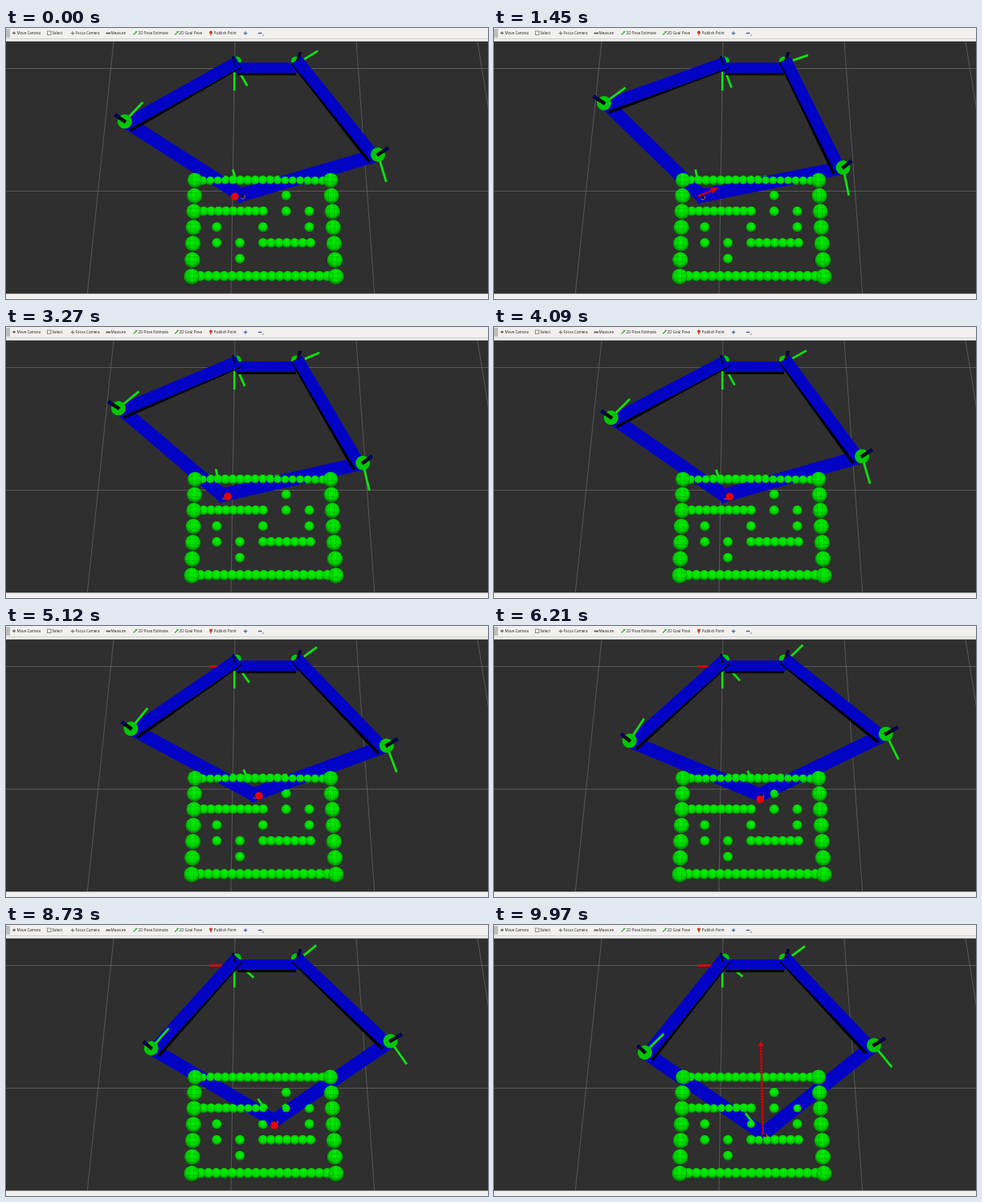
Animation of 600x338 px, one loop 10 s. Source, as an HTML page with a canvas:

```html
<!DOCTYPE html>
<html>
<head>
<meta charset="utf-8">
<style>
html, body { margin: 0; width: 100%; height: 100%; overflow: hidden; background: #303030; }
canvas { display: block; width: 600px; height: 338px; }
</style>
</head>
<body>
<canvas id="stage" width="600" height="338"></canvas>
<script>
const ctx = document.getElementById('stage').getContext('2d');
const LOOP = 10000, LEAD = 320, QUARTER = Math.PI / 2;
const BLUE = '#0303c6', SHADE = '#020208', LIME = '#12e012', RED = '#e60404';
const BASE_L = [284.5, 44.5], BASE_R = [364.5, 43];

// Effector waypoints: time, x, y
const PATH = [[0, 292.5, 210], [1700, 252, 211], [2450, 252, 211], [6210, 331, 212], [9970, 335, 262]];

function pathAt(t) {
  const next = PATH.findIndex(p => p[0] > t);
  const i = next < 0 ? PATH.length - 1 : next;
  const [t0, x0, y0] = PATH[i - 1], [t1, x1, y1] = PATH[i];
  const k = Math.min(1, (t - t0) / (t1 - t0));
  return [x0 + (x1 - x0) * k, y0 + (y1 - y0) * k];
}

// Perspective of the work plane; one unit is one grid cell
const HORIZON = -1695, NEAR = 1 / 1745, DEPTH = 4.62e-5;
const cellWidth = y => (y - HORIZON) * 0.0882;
const middle = y => 285.3 - 0.0159 * y;

function toPlane([x, y]) {
  return [(x - middle(y)) / cellWidth(y), (NEAR - 1 / (y - HORIZON)) / DEPTH];
}

function toScreen([u, v]) {
  const y = 1 / (NEAR - v * DEPTH) + HORIZON;
  return [middle(y) + u * cellWidth(y), y];
}

function elbow(pivot, tip, upper, lower, side) {
  const [bx, by] = toPlane(pivot), [tx, ty] = toPlane(tip);
  const dx = tx - bx, dy = ty - by, d = Math.hypot(dx, dy);
  const along = (upper ** 2 - lower ** 2 + d * d) / (2 * d);
  const out = side * Math.sqrt(upper ** 2 - along ** 2);
  return toScreen([bx + (dx * along - dy * out) / d, by + (dy * along + dx * out) / d]);
}

function poseAt(t) {
  const tip = pathAt(t);
  return {
    tip,
    goal: pathAt(t + LEAD),
    left: elbow([281, 38], tip, 0.987, 1.084, 1),
    right: elbow([367, 40], tip, 0.974, 1.088, -1)
  };
}

const angle = (a, b) => Math.atan2(b[1] - a[1], b[0] - a[0]);
const polar = (p, r, a) => [p[0] + r * Math.cos(a), p[1] + r * Math.sin(a)];

function line(a, b, color, width) {
  ctx.strokeStyle = color;
  ctx.lineWidth = width;
  ctx.beginPath();
  ctx.moveTo(...a);
  ctx.lineTo(...b);
  ctx.stroke();
}

function dot(x, y, r, color) {
  ctx.fillStyle = color;
  ctx.beginPath();
  ctx.arc(x, y, r, 0, 7);
  ctx.fill();
}

function link(a, b, width, start, end, shadeSide = 0) {
  const dir = angle(a, b), p = polar(a, -start, dir), q = polar(b, end, dir);
  if (shadeSide) {
    const side = dir + shadeSide * QUARTER;
    line(polar(p, 1.5, side), polar(q, 3.8, side), SHADE, width);
  }
  line(p, q, BLUE, width);
}

function axis(p, from, to, a) {
  line(polar(p, from, a), polar(p, to, a), LIME, 2.8);
}

// Maze spheres: x, y, radius
const balls = [];
function row(x0, x1, y, count, r) {
  for (let i = 0; i < count; i++) balls.push([x0 + (x1 - x0) * i / (count - 1), y, r]);
}
row(245, 394, 190, 17, 6);
row(242, 400, 309.5, 17, 6.4);
row(246, 320, 228.5, 9, 6.1);
row(320, 379, 268, 7, 6.1);
['   o ', '   oo', 'o o o', 'oo   ', ' o   '].forEach((cells, j) => {
  [...cells].forEach((c, i) => {
    if (c === 'o') balls.push([262.3 + 28.8 * i, 209 + 19.7 * j, 6.1]);
  });
});
for (let i = 0; i < 7; i++) {
  const y = 189.8 + 19.3 * i + 0.12 * i * i, r = 9.4 + 0.06 * i;
  balls.push([235.3 - 0.68 * i, y, r], [404 + 1.1 * i, y, r]);
}

function drawBall([x, y, r], scale) {
  const g = ctx.createRadialGradient(x, y - r * 0.35, r * 0.2, x, y - r * 0.1, r * 1.12);
  g.addColorStop(0, '#00ec00');
  g.addColorStop(0.6, '#00d600');
  g.addColorStop(1, '#007800');
  dot(x, y, r * scale, g);
  if (r < 8) return;
  const h = r * 0.85;
  for (const d of [-0.4 * r, 0.25 * r]) {
    line([x - h, y + d], [x + h, y + d], 'rgba(0,90,0,.25)', 0.7);
    line([x + d, y - h], [x + d, y + h], 'rgba(0,90,0,.25)', 0.7);
  }
}

function drawGrid() {
  ctx.fillStyle = '#2f2f2f';
  ctx.fillRect(0, 0, 600, 338);
  const gray = '#626262';
  for (const y of [50.5, 203.5]) line([0, y], [600, y], gray, 0.8);
  for (let k = -2; k <= 2; k++) line([285 + 151 * k, 17], [280 + 178.7 * k, 331], gray, 0.8);
}

function joint([x, y]) {
  dot(x, y, 9, '#00c800');
  const dx = (x - 300) * 0.08, dy = -8.5, end = [x + dx, y + dy];
  line([x - dx * 0.1, y - dy * 0.1], end, '#050510', 4.5);
  line([x + dx * 0.6, y + dy * 0.6], end, '#05055c', 4.3);
}

function drawArms({ left, right, tip }) {
  // Links lie below the joint discs, so they shift toward the view centre
  const sunk = ([x, y]) => [x - (x - 300) * 0.028, y + 2];
  const end = [tip[0], tip[1] - 1.5];
  const normal = angle(right, tip) - QUARTER;

  if (left[1] > 120) line([253, 50.5], [285, 50.5], RED, 2.6);
  dot(287, 41.5, 6, '#00c800');
  dot(360.8, 41.5, 6, '#00c800');
  axis(BASE_L, 8, 32, angle(BASE_L, left) - QUARTER - 0.035);
  line([284.3, 54], [284.3, 78], LIME, 2.6);
  axis(BASE_R, 8, 28, angle(BASE_R, right) - QUARTER + 0.16);

  line([288, 53], [361, 53], SHADE, 12);
  line([285, 49.5], [364, 49.5], BLUE, 13);
  link(sunk(left), end, 16.5, 2, 6);
  link(right, end, 17, 3, 6);
  link(BASE_L, sunk(left), 15, 5, 2, -1);
  link(BASE_R, sunk(right), 14.5, 4, 2, 1);

  line([282.5, 35], [285, 46], '#04044a', 3);
  line([366.5, 30], [363, 41], '#05053c', 4);
  axis(left, 8, 33, angle(left, tip) - QUARTER + 0.18);
  axis(right, 8, 35.5, normal);
  axis(tip, -21, -35, normal);
  joint(left);
  joint(right);
}

function arrow(a, b, head) {
  const dir = angle(a, b), neck = polar(b, -head, dir);
  line(a, neck, RED, 2.4);
  ctx.setLineDash([1.5, 2]);
  line(a, neck, '#800000', 1.4);
  ctx.setLineDash([]);
  ctx.fillStyle = '#d00808';
  ctx.beginPath();
  ctx.moveTo(...b);
  ctx.lineTo(...polar(neck, 4, dir + QUARTER));
  ctx.lineTo(...polar(neck, 4, dir - QUARTER));
  ctx.fill();
}

function drawGoal(t, { tip: [x, y], goal }) {
  line([x, y - 3], [x + 4, y + 3], '#101018', 2);
  ctx.strokeStyle = '#c87832';
  ctx.lineWidth = 1;
  ctx.beginPath();
  ctx.arc(x + 2, y + 0.5, 2.7, -0.8, 2.5);
  ctx.stroke();
  if (t > 1400 && t < 1530) arrow([x - 4, y - 1], [x + 22, y - 12], 10);
  else if (t > 9900) arrow([x, y], [x - 3, y - 117], 6);
  else dot(...goal, 4.8, RED);
}

const LABELS = [
  [13.5, 'Move Camera'], [57.5, 'Select'], [86.5, 'Focus Camera'], [130.5, 'Measure'],
  [164.5, '2D Pose Estimate'], [215.5, '2D Goal Pose'], [258.8, 'Publish Point']
];

function plus(x, y, r, color, width) {
  line([x - r, y], [x + r, y], color, width);
  line([x, y - r], [x, y + r], color, width);
}

function drawToolbar() {
  ctx.fillStyle = '#f1f0ef';
  ctx.fillRect(0, 0, 600, 16.7);
  ctx.fillRect(0, 331.4, 600, 7);
  ctx.fillStyle = '#cfcfcf';
  ctx.fillRect(0, 13, 600, 1);
  ctx.fillStyle = '#bdbdbd';
  ctx.fillRect(0, 1, 5, 11);
  ctx.fillStyle = '#222';
  ctx.font = '4.6px "Open Sans", "Noto Sans", sans-serif';
  for (const [x, text] of LABELS) ctx.fillText(text, x, 8.2);

  dot(10, 6.3, 1.8, '#777');
  ctx.strokeStyle = '#777';
  ctx.lineWidth = 0.8;
  ctx.strokeRect(51.5, 4, 4.5, 4.5);
  plus(83, 6.5, 2.4, '#666', 0.9);
  line([124.5, 6.5], [130, 6.5], '#666', 2);
  for (const x of [158.5, 210]) {
    line([x, 8.5], [x + 4.5, 4.5], '#2fae2f', 1.2);
    line([x + 2.5, 4.3], [x + 5, 4.3], '#2fae2f', 1);
  }
  dot(255, 5.5, 1.9, '#c8381c');
  line([255, 6], [255, 9.2], '#c8381c', 1.2);
  plus(298.1, 6.5, 2.3, '#4a70a8', 1.3);
  line([314, 6.5], [318.5, 6.5], '#4a5a80', 1.4);
  dot(320, 9, 0.7, '#555');
}

function frame(now) {
  const t = now % LOOP, pose = poseAt(t);
  drawGrid();
  for (const b of balls) drawBall(b, 1);
  drawArms(pose);
  // Sphere tops poke through the links
  for (const b of balls) drawBall(b, b[2] > 8 ? 0.97 : 0.8);
  drawGoal(t, pose);
  drawToolbar();
  requestAnimationFrame(frame);
}
frame(0);
</script>
</body>
</html>
```
